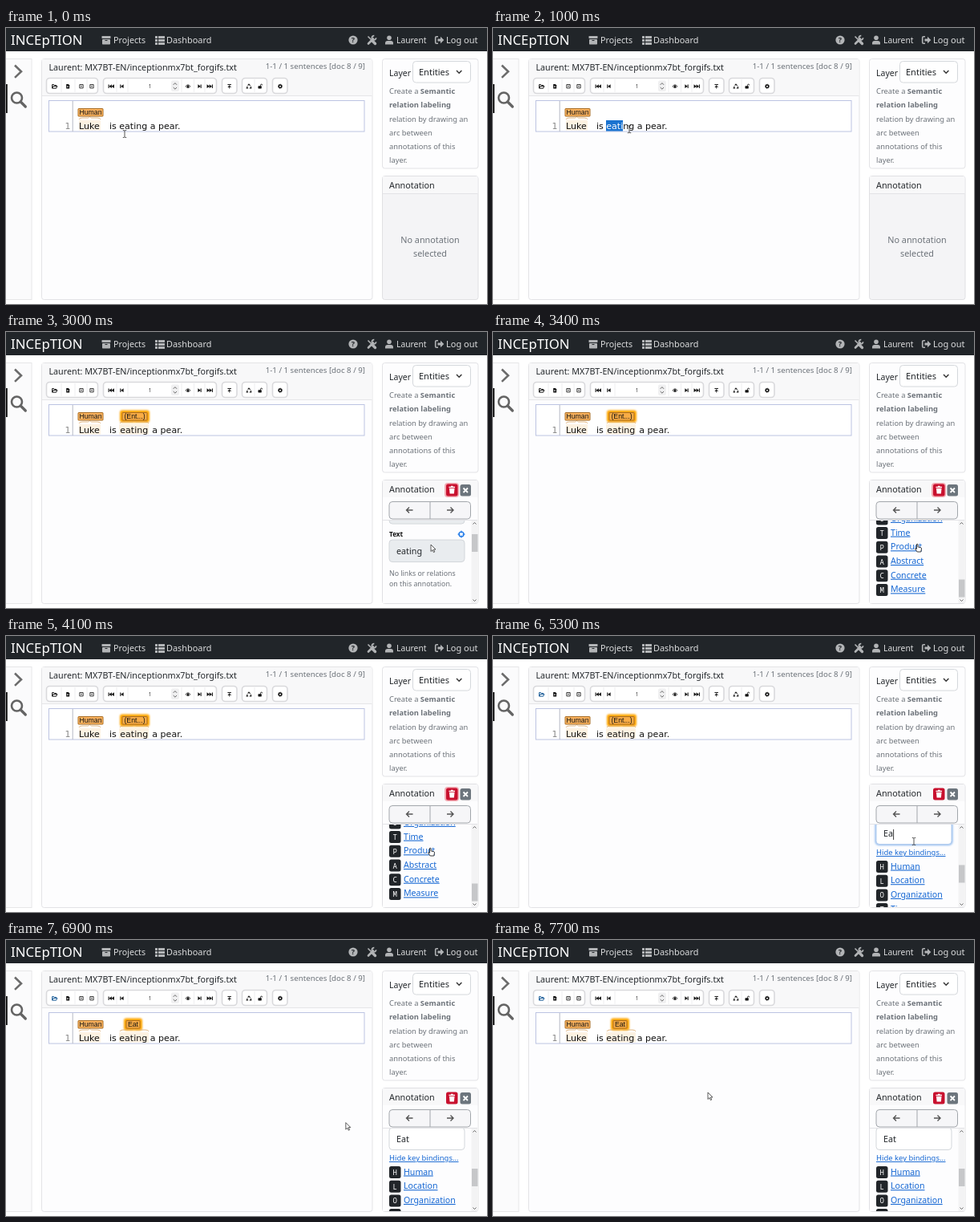
Recreate the animation shown at these times as an HTML page. Size 600 by 344 pixels, loop 7800 ms.

```html
<!DOCTYPE html>
<html lang="en">
<head>
<meta charset="utf-8">
<style>
  html, body { margin: 0; width: 100%; height: 100%; overflow: hidden; background: #fff; }
  svg { display: block; width: 600px; height: 344px; font-family: "Noto Sans", "Open Sans", sans-serif; }
  text { white-space: pre; }
  .doc { font-family: "DejaVu Sans", sans-serif; }
  .label { font-family: "Liberation Sans", Arial, sans-serif; text-anchor: middle; }
  .mono { font-family: "Noto Sans Mono", monospace; text-anchor: middle; }
  .link { text-decoration: underline; fill: #1567d3; }
</style>
</head>
<body>
<svg id="stage" viewBox="0 0 600 344"></svg>
<script>
const LOOP = 7800, STEP = 100;
const stage = document.getElementById('stage');
const INK = '#24282c', MUTED = '#6c7279', NAV = '#dcddde', NAV_ICON = '#b2b4b6';

const text = (x, y, size, str, fill = INK, extra = '') =>
  `<text x="${x}" y="${y}" font-size="${size}" fill="${fill}" ${extra}>${str}</text>`;
const box = (x, y, w, h, fill, stroke = 'none', r = 0, extra = '') =>
  `<rect x="${x}" y="${y}" width="${w}" height="${h}" rx="${r}" fill="${fill}" stroke="${stroke}" ${extra}/>`;
const line = (d, stroke, width = 1, extra = '') =>
  `<path d="${d}" fill="none" stroke="${stroke}" stroke-width="${width}" ${extra}/>`;
const shape = (d, fill = '#111', extra = '') => `<path d="${d}" fill="${fill}" ${extra}/>`;
const group = (id, body, extra = '') => `<g id="${id}" ${extra}>${body}</g>`;
const at = (x, y, body, scale = 1) => `<g transform="translate(${x} ${y}) scale(${scale})">${body}</g>`;

function navbar() {
  const dashboard = [10, 14, 18].map(y =>
    box(186, y, 3, 3, NAV_ICON) + box(190, y, 8, 3, NAV_ICON)).join('');
  const tools = line('M451.5 10.5l4 4', NAV_ICON, 1.6) + line('M456.500 15.500l4 4', NAV_ICON, 3.4, 'stroke-linecap="round"')
    + line('M452 19.500l6-6', NAV_ICON, 2.6, 'stroke-linecap="round"')
    + line('M459.300 9.700a2.600 2.600 0 1 0 2.300 2.600', NAV_ICON, 1.8);
  return box(0, 0, 600, 29, '#212529')
    + text(6, 21, 16.8, 'INCEpTION', '#fff')
    + box(119.5, 10, 11, 3, NAV_ICON, 'none', .5) + box(120, 14, 10, 6.5, NAV_ICON, 'none', .8)
    + line('M123.5 15.5h3', '#212529')
    + text(134, 18.8, 10.7, 'Projects', NAV) + dashboard
    + text(200, 18.8, 10.9, 'Dashboard', NAV)
    + `<circle cx="433" cy="15" r="5.6" fill="${NAV_ICON}"/>`
    + text(433, 18.2, 9, '?', '#212529', 'text-anchor="middle" font-weight="700"')
    + tools
    + `<circle cx="478" cy="12.3" r="2.8" fill="${NAV_ICON}"/>`
    + shape('M473 20.5v-1.5q0-3 3-3h4q3 0 3 3v1.5z', NAV_ICON)
    + text(487, 18.8, 10.3, 'Laurent', NAV)
    + line('M539 10.7h-2q-1.3 0-1.3 1.3v6q0 1.3 1.3 1.3h2', NAV_ICON, 1.6)
    + shape('M538.5 13.5h3.5v-2.7l4.3 4.2-4.3 4.2v-2.7h-3.5z', NAV_ICON)
    + text(549, 18.8, 11, 'Log out', NAV);
}

function sidebar() {
  return box(-1, 38.5, 33, 300, '#fbfbfc', '#e6e6e8')
    + box(0, 70, 1.8, 36, '#111')
    + line('M11 46.5l8 7.7-8 7.7', '#6c6c6c', 2.6)
    + `<circle cx="13.5" cy="87" r="6.5" fill="none" stroke="#646464" stroke-width="2.6"/>`
    + line('M18.3 92l6 6', '#646464', 3.3, 'stroke-linecap="round"');
}

function toolbar() {
  const frames = [[50, 65], [121, 142], [269, 19.5], [294, 32], [332, 19.5]]
    .map(([x, w]) => box(x + .5, 62.5, w - 1, 19, '#fff', '#d9d9dc', 4, 'stroke-width="1.6"')).join('');
  const tri = dir => shape(`M${-1.8 * dir}-2.6L${2 * dir} 0L${-1.8 * dir} 2.6z`);
  const toBar = dir => tri(dir) + box(2.4 * dir - .6, -2.5, 1.2, 5, '#111');
  const toEnd = dir => at(-2.6 * dir, 0, tri(dir)) + at(.8 * dir, 0, toBar(dir));
  const boxed = line('M-2.4-2.4h4.8v4.8h-4.8z', '#222') + shape('M-1 0h2M0-1l1 1-1 1-1-1z');
  const icons = [
    [77, shape('M-2-3h3l1.4 1.4v4.8h-4.4z') + box(-.8, -.4, 1.6, 1.6, '#fff')],
    [94, boxed], [107, boxed],
    [131, toEnd(-1)], [145, toBar(-1)],
    [227, line('M-3.2 0q3.2-4 6.4 0q-3.2 4-6.4 0z', '#111') + '<circle r="1.4"/>'],
    [241, toBar(1)], [254.5, toEnd(1)],
    [278.7, line('M-2.5-2.5h5M0 3v-4M-2 1.5l2-2.5 2 2.5', '#111', 1.1)],
    [303, line('M-1.5-1.2L0-3l1.8 2M2.6.2l.5 2.3H.8M-1 2.5h-2l1-2.4', '#111', 1.2)],
    [317, box(-2.8, -.4, 4.8, 3.4, '#111', 'none', .6) + line('M.6 0v-1.5q0-1.4 1.2-1.4t1.2 1.4', '#111')],
    [342, '<circle r="1.9" fill="none" stroke="#111" stroke-width="1.6"/><circle r="2.8" fill="none" stroke="#111" stroke-width="1" stroke-dasharray="1.1 1.1"/>'],
  ].map(([x, body]) => at(x, 72.7, body, .9)).join('');
  return frames
    + line('M69 64v16M86 64v16M101 64v16M138 64v16M152 64v16M219 64v16M234.5 64v16M248 64v16M310 64v16', '#eeeef0')
    + at(60.5, 72.7, line('M-2.8 2.4v-4.6h2l.8.9h2.2v1M-2.8 2.4l1.2-2.7h5l-1.2 2.7z', '#111', 1, 'id="open"'))
    + icons + text(179.5, 75, 6.5, '1', '#333', 'text-anchor="middle"')
    + box(206, 65.5, 10, 13.5, '#f0f0f1', 'none', 2)
    + line('M208.7 70.8l2.2-2.2 2.2 2.2M208.7 74l2.2 2.2 2.2-2.2', '#555', .9);
}

const brace = (x, w) => line(
  `M${x} 114q.5-2 4-2h${w / 2 - 6}l2-1.5 2 1.5h${w / 2 - 6}q3.5 0 4 2`, '#d9a566', .8);
const labelBox = (x, w, str, fill = '#f9b25f') =>
  box(x, 100.5, w, 9.5, fill, '#a86c22', .5) + text(x + w / 2, 108.3, 8.7, str, '#111', 'class="label"');

function editor() {
  const docText = (x, str, extra = '', fill = '#111') => text(x, 125.5, 11.05, str, fill, `class="doc" ${extra}`);
  return box(44.5, 38.5, 412.5, 300, '#fdfdfe', '#e3e3e6', 3)
    + box(45, 39, 411.5, 45, '#f8f8f9') + line('M45 84.5h411.5', '#e6e6e8')
    + text(53.4, 52.6, 10.75, 'Laurent: MX7BT-EN/inceptionmx7bt_forgifs.txt')
    + text(448, 51, 9.7, '1-1 / 1 sentences [doc 8 / 9]', MUTED, 'text-anchor="end"')
    + toolbar()
    + box(53.5, 90.5, 393.5, 38.5, '#fff', '#bcc4e2')
    + line('M83.2 91v38', '#b5b8c4')
    + text(80.5, 125.5, 11, '1', '#888', 'class="doc" text-anchor="end"')
    + box(91, 115, 27, 12.5, '#fdf2e2') + brace(91, 27) + labelBox(90, 31, 'Human')
    + docText(91, 'Luke') + docText(129, 'is')
    + box(141, 115, 37, 12.5, '#fdf2e2', 'none', 0, 'id="tokenBack"')
    + box(142, 96, 36.5, 17.5, '#fdeccb', 'none', 3, 'id="halo"')
    + box(142, 97.5, 37, 15.3, '#ffa500', 'none', 3, 'id="glow" filter="url(#blur)"')
    + group('braceNew', brace(142, 36))
    + group('pending', labelBox(145, 31, '(Ent...)', '#f9ac45')) + group('done', labelBox(150, 17, 'Eat', '#f9ac45'))
    + docText(141.3, 'eating', 'id="word"') + docText(179.7, 'a pear.', 'id="tail"')
    + box(141, 115, 0, 13.5, '#1a73d0', 'none', 0, 'id="selection"')
    + `<g clip-path="url(#selected)">${docText(141.3, 'eating', '', '#fff')}</g>`;
}

function layerPanel() {
  const rows = ['Create a <tspan font-weight="700">Semantic</tspan>',
    '<tspan font-weight="700">relation labeling</tspan>',
    'relation by drawing an', 'arc between', 'annotations of this', 'layer.'];
  return box(469.5, 38.5, 119.5, 136.5, '#fdfdfe', '#e3e3e6', 3)
    + text(478, 60, 10.5, 'Layer')
    + box(507.5, 41.5, 72, 26.5, '#fff', '#d5d8dc', 4)
    + text(515, 58.8, 11, 'Entities')
    + line('M562 53l3.2 3.2 3.2-3.2', '#333', 1.4)
    + rows.map((row, i) => text(478, 82 + 17.25 * i, 9.35, row, MUTED)).join('');
}

function details() {
  const field = (y, str, id, back = '#e9ecef') =>
    box(478, y, 94, 27.5, back, '#d3d7db', 4, `id="${id}Box"`)
    + text(487, y + 18.3, 10.75, str, INK, `id="${id}Text"`);
  const tags = ['Human', 'Location', 'Organization', 'Time', 'Product', 'Abstract', 'Concrete', 'Measure'];
  const caption = (y, str) => text(478, y, 8.2, str, '#111', 'font-weight="700"');
  const list = tags.map((tag, i) => {
    const y = 459 + 17.7 * i;
    return box(478, y - 7, 14.5, 15, '#212529', 'none', 2.5)
      + text(485.2, y + 4, 9, tag[0], '#fff', 'class="mono"')
      + text(496, y + 3.5, 10.6, tag, '', 'class="link"');
  }).join('');
  return caption(248, 'Layer') + field(252.5, 'Entities', 'layer')
    + caption(296, 'Text') + field(300, 'eating', 'span')
    + '<circle cx="568" cy="293" r="3" fill="none" stroke="#1573e6" stroke-width="1.3"/>'
    + line('M568 288.5v3M568 294.5v3M563.5 293h3M569.5 293h3', '#1573e6')
    + text(478, 344.5, 8.8, 'No links or relations', MUTED)
    + text(478, 358, 8.8, 'on this annotation.', MUTED)
    + caption(398, 'value')
    + box(476.5, 402.5, 97, 30.5, '#8fb9ee', 'none', 5, 'id="focus" filter="url(#blur)"')
    + field(404, '', 'value', '#fff')
    + line('M0 413v13', '#222', .9, 'id="caret"')
    + line('M555 417l6 6M561 417l-6 6', '#111', 1.8, 'id="clear"')
    + text(478, 445, 9.45, 'Hide key bindings...', '', 'class="link"') + list;
}

function annotationPanel() {
  const arrow = (x, dir) => line(`M${x - 4 * dir} 222h${8 * dir}m${-3.5 * dir}-3.5l${3.5 * dir} 3.5l${-3.5 * dir} 3.5`, '#555', 1.4);
  const trash = line('M552.5 193.5h7.5M555 192.5h2.5', '#fff', 1.3) + shape('M553 195h6.5l-.6 6.5h-5.3z', '#fff');
  const open = box(470, 206, 118.5, 132, '#fdfdfe')
    + box(547, 188, 18, 18, '#f3aab2', 'none', 4, 'id="ring"')
    + box(549, 189.5, 14.5, 15, '#c8102e', 'none', 2.5) + trash
    + box(566.5, 190, 13.5, 14.5, '#6c757d', 'none', 2.5)
    + line('M570.5 194.5l5.5 5.5M576 194.5l-5.5 5.5', '#fff', 1.8)
    + box(478, 211.5, 101.5, 21.5, '#f6f6f8', '#a2a6ab', 4) + line('M529 211.5v21.5', '#a2a6ab')
    + arrow(503.5, -1) + arrow(554, 1) + line('M470 234.5h118', '#e3e3e6')
    + `<g clip-path="url(#view)">${group('details', details())}</g>`
    + box(580.5, 235, 8, 103, '#f3f3f4')
    + line('M582.5 239.5l2-2 2 2M582.5 333.5l2 2 2-2', '#666')
    + box(581, 241.5, 7.5, 22, '#c6c7c9', 'none', 0, 'id="thumb"');
  return box(469.5, 184.5, 119.5, 154, '#f4f4f6', '#e0e0e3', 3)
    + box(470, 185, 118.5, 21, '#f8f8f9') + line('M470 206.5h118.5', '#e3e3e6')
    + text(529, 268, 10.8, 'No annotation', MUTED, 'text-anchor="middle"')
    + text(529, 285, 10.8, 'selected', MUTED, 'text-anchor="middle"')
    + group('open-panel', open)
    + text(478, 200, 10.8, 'Annotation');
}

const spokes = Array.from({ length: 12 }, (_, i) =>
  `<path d="M0-6.5v-4.3" stroke="#222" stroke-width="2" stroke-linecap="round" opacity="${.2 + i / 14}" transform="rotate(${30 * i})"/>`).join('');

const cursors = {
  beam: line('M-2.2-4.5h1.5l.7.7.7-.7h1.5M0-4v8M-2.2 4.5h1.5l.7-.7.7.7h1.5', '#444', .9),
  arrow: shape('M0-4v8.5l2-1.9 1.4 3 1.4-.6-1.4-3h2.6z', '#fff', 'stroke="#333" stroke-width=".8"'),
  hand: shape('M-1.5-4.5q1.1-.9 1.6.4v3l3.5.8q1 .3.9 1.5l-.7 3.8h-4.6l-2.7-3.6q-.2-1.4 2 0z', '#fff', 'stroke="#222" stroke-width=".9"'),
};

stage.innerHTML = `<defs>
    <filter id="blur" x="-40%" y="-80%" width="180%" height="260%"><feGaussianBlur stdDeviation="1.2"/></filter>
    <clipPath id="view"><rect x="470" y="235" width="110" height="103"/></clipPath>
    <clipPath id="selected"><rect id="selectedClip" x="141" y="114" width="0" height="16"/></clipPath>
  </defs>` + box(0, 0, 600, 344, '#fff') + navbar() + sidebar() + editor() + layerPanel() + annotationPanel()
  + group('spinner', spokes)
  + group('pointer', Object.entries(cursors).map(([id, body]) => group(id, body)).join(''));

const el = id => document.getElementById(id);
const show = (id, on) => el(id).setAttribute('visibility', on ? 'inherit' : 'hidden');
const set = (id, name, value) => el(id).setAttribute(name, value);
const within = (t, a, b) => t >= a && t < b;

// Eased interpolation over [time, value] stops.
function track(t, stops) {
  const i = stops.findIndex(s => s[0] > t);
  if (i < 0) return stops[stops.length - 1][1];
  if (i === 0) return stops[0][1];
  const [t0, a] = stops[i - 1], [t1, b] = stops[i];
  const p = (t - t0) / (t1 - t0);
  return a + (b - a) * p * p * (3 - 2 * p);
}

const pointerX = [[300, 148], [700, 142], [800, 142], [1000, 170], [1200, 177], [1800, 177], [2400, 310],
  [2500, 310], [2900, 530], [4400, 530], [4700, 525], [6600, 525], [7300, 268]];
const pointerY = [[300, 132], [700, 126], [1800, 127], [2400, 203], [2500, 203], [2900, 269],
  [4400, 269], [4700, 256], [6600, 256], [7300, 194]];
const scrollStops = [[2900, 0], [3300, 262], [4100, 262], [4500, 172], [5400, 172], [5500, 170]];
const selectionStops = [[800, 0], [1000, 21], [1300, 35.5]];

function render(t) {
  const created = t >= 1800, finished = t >= 6400, pending = created && !finished;
  const focused = within(t, 4700, 6600);

  const width = created ? 0 : track(t, selectionStops);
  set('selection', 'width', width);
  set('selectedClip', 'width', width);

  show('tokenBack', created);
  show('braceNew', created);
  show('pending', pending);
  show('done', finished);
  show('halo', within(t, 1800, 2700));
  set('halo', 'opacity', track(t, [[2400, 1], [2700, 0]]));
  set('glow', 'opacity', track(t, [[2400, 0], [2700, 1]]));
  set('glow', 'x', finished ? 147 : 142);
  set('glow', 'width', finished ? 23 : 37);
  set('word', 'x', pending ? 142.3 : 141.3);
  set('tail', 'x', pending ? 182.3 : 179.7);

  show('open-panel', created);
  show('ring', created && t < 4700);
  set('open', 'stroke', t >= 4700 ? '#175a96' : '#111');
  const scroll = track(t, scrollStops);
  set('details', 'transform', `translate(0 ${-scroll})`);
  set('thumb', 'y', 241.5 + 67 * scroll / 262);

  const typed = 'Eat'.slice(0, [5000, 5200, 5500].filter(s => t >= s).length);
  el('valueText').textContent = typed;
  show('focus', focused);
  set('valueBox', 'stroke', focused ? '#b4cdee' : '#d3d7db');
  show('caret', focused);
  set('caret', 'transform', `translate(${487.6 + [0, 6, 12, 16][typed.length]} 0)`);
  show('clear', within(t, 5500, 6600));

  show('spinner', within(t, 1700, 1900) || within(t, 5900, 6400));
  set('spinner', 'transform', `translate(581.3 51) rotate(${Math.floor(t / STEP) * 30})`);

  const overText = t < 1800 || within(t, 4500, 6700);
  const overLink = within(t, 3200, 4500);
  show('beam', overText);
  show('hand', overLink);
  show('arrow', !overText && !overLink);
  set('pointer', 'transform', `translate(${track(t, pointerX)} ${track(t, pointerY)})`);
}

const start = performance.now();
function tick() {
  const t = (performance.now() - start) % LOOP;
  render(Math.floor(t / STEP) * STEP);
  requestAnimationFrame(tick);
}
tick();
</script>
</body>
</html>
```
